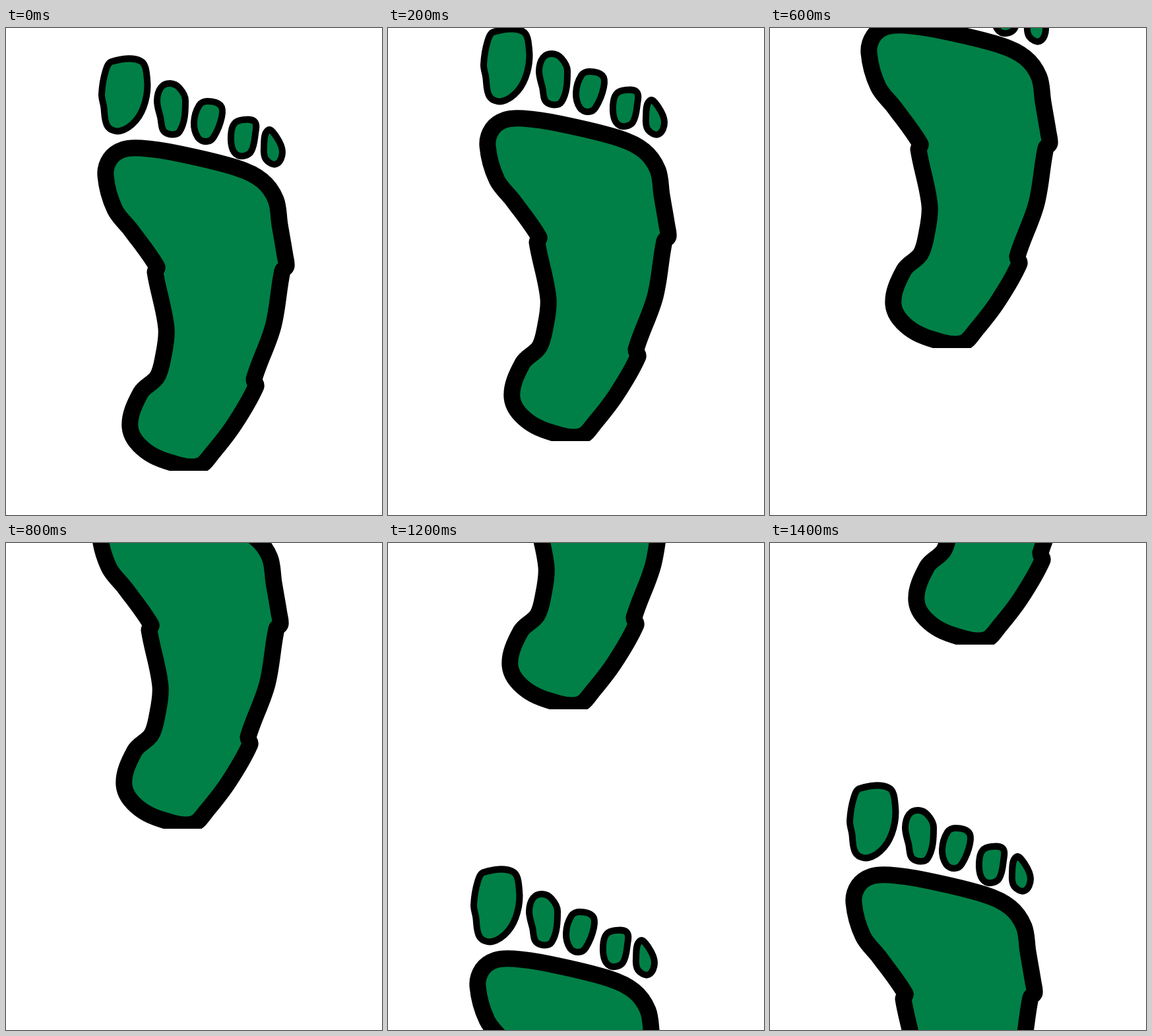
Animation, 570 px wide and 738 px high, one loop 1.6 s. Source, as an HTML page with a canvas:

```html
<!DOCTYPE html>
<html lang="en">
<head>
<meta charset="utf-8">
<title>Footsteps</title>
<style>
  html, body { margin: 0; width: 100%; height: 100%; overflow: hidden; background: #fff; }
  canvas { display: block; }
</style>
</head>
<body>
<canvas id="stage" width="570" height="738"></canvas>
<script>
const ctx = document.getElementById('stage').getContext('2d');
const W = 570, H = 738, STEP = 200, FOOT_BOTTOM = 671;
const INK = '#000', GREEN = '#008046';

// Smooth closed curve through "x,y x,y ..." points; handles scale with
// the segment length so that small kinks stay tight.
function curve(text) {
  const pts = text.trim().split(/\s+/).map(p => p.split(',').map(Number));
  const n = pts.length, at = i => pts[(i + n) % n];
  const handle = (i, length) => {
    const [x0, y0] = at(i - 1), [x1, y1] = at(i + 1);
    const k = length / 3 / Math.hypot(x1 - x0, y1 - y0);
    return [(x1 - x0) * k, (y1 - y0) * k];
  };
  const path = new Path2D();
  path.moveTo(...pts[0]);
  for (let i = 0; i < n; i++) {
    const [ax, ay] = at(i), [bx, by] = at(i + 1);
    const length = Math.hypot(bx - ax, by - ay);
    const [ux, uy] = handle(i, length), [vx, vy] = handle(i + 1, length);
    path.bezierCurveTo(ax + ux, ay + uy, bx - vx, by - vy, bx, by);
  }
  path.closePath();
  return path;
}

// Each part is the middle line of one brush stroke
const sole = curve(
  `151,224 158,198 178,184 205,182 260,190 350,212 388,231 409,260 415,298
   423,345 425,361 419,368 405,452 376,532 379,543 346,601 313,644 294,663
   262,662 212,641 188,605 204,553 229,529 238,500 243,455 226,370 229,362
   190,307 165,275`);
const toes = [
  '145,100 151,65 160,51 204,50 214,78 211,112 197,140 173,156 154,149 148,118',
  '229,110 235,90 249,84 263,91 272,110 263,157 241,158 234,135',
  '285,143 293,117 305,111 325,117 327,135 315,165 304,172 291,166',
  '341,163 346,145 360,139 377,142 378,160 371,188 355,194 344,185',
  '391,180 397,155 410,165 419,188 410,206 394,199'
].map(curve);

// Offsets of the visible feet in each pose
const poses = [
  [[0, 0]],
  [[0, -45]],
  [[-5, -120]],
  [[-1, -186]],
  [[-9, -238]],
  [[-15, -319], [1, 586]],
  [[-3, -419], [-15, 448]],
  [[34, -517], [-24, 321]]
];

function paint(path, brush) {
  ctx.lineWidth = brush;
  ctx.fill(path);
  ctx.stroke(path);
}

function drawFoot([dx, dy]) {
  ctx.save();
  ctx.translate(dx, dy);
  ctx.beginPath();
  ctx.rect(0, 0, W, FOOT_BOTTOM);
  ctx.clip();
  paint(sole, 25);
  toes.forEach(toe => paint(toe, 10));
  ctx.restore();
}

ctx.lineJoin = 'round';
ctx.strokeStyle = INK;
const start = performance.now();

function draw() {
  const elapsed = Math.max(0, performance.now() - start);
  ctx.fillStyle = '#fff';
  ctx.fillRect(0, 0, W, H);
  ctx.fillStyle = GREEN;
  poses[Math.floor(elapsed / STEP) % poses.length].forEach(drawFoot);
  requestAnimationFrame(draw);
}
draw();
</script>
</body>
</html>
```
